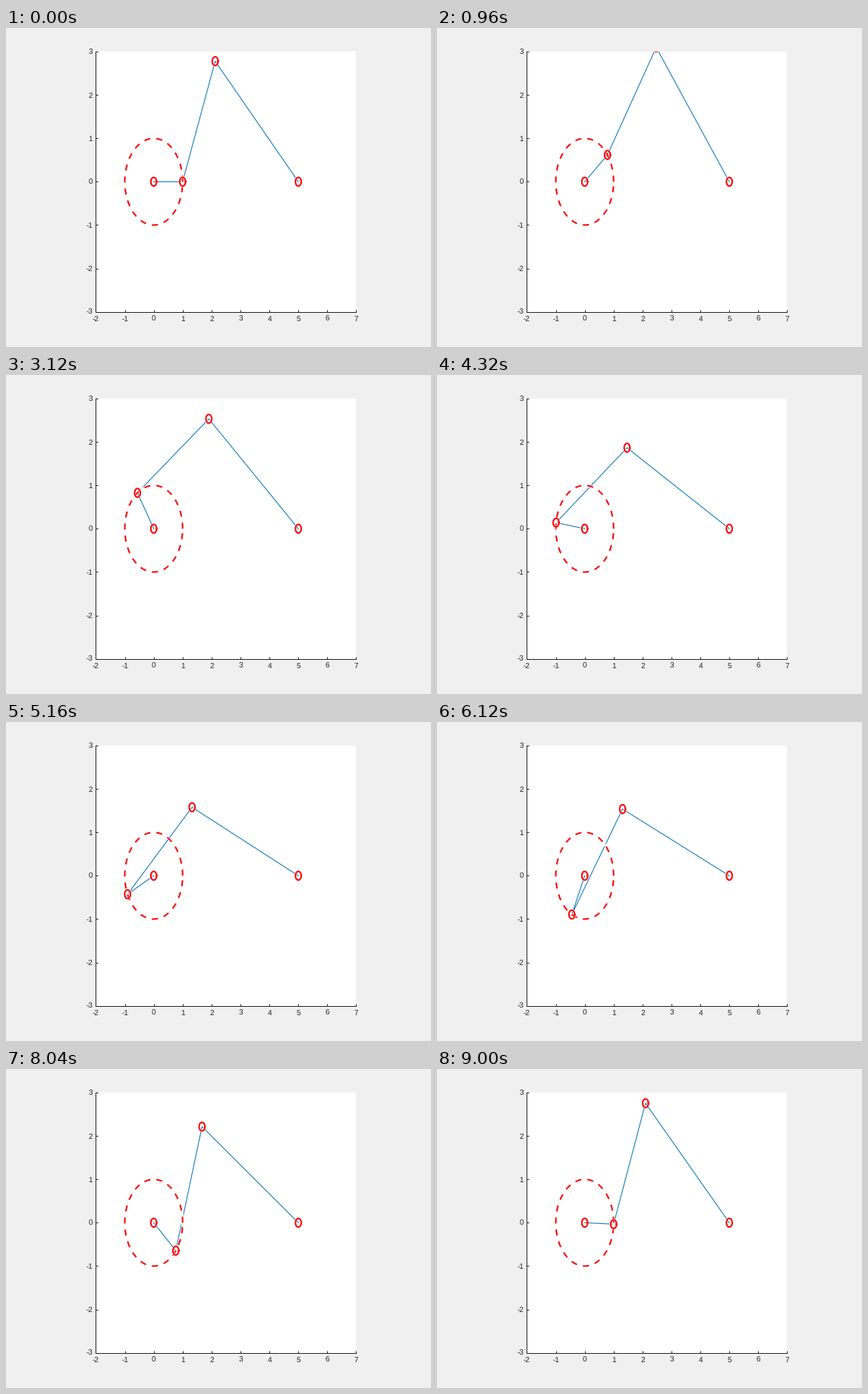
Write a matplotlib script that moves like this. It is 560 px wide and 420 px high and loops after 9120 ms.

```python
import numpy as np
import matplotlib.pyplot as plt
from matplotlib.animation import FuncAnimation

plt.rcParams["text.hinting"] = "none"

W, H, DPI = 560, 420, 100
PX = 72 / DPI                      # one pixel in points
LEFT, RIGHT, TOP, BOTTOM = 118.4, 461.4, 31.2, 373.6
X_MIN, X_MAX, Y_MIN, Y_MAX = -2, 7, -3, 3
INK, RED, BLUE = "#262626", "#ff0000", "#0072bd"

CRANK, COUPLER, ROCKER, GROUND = 1, 3, 4, 5
JOINT_R = 0.1
FRAMES, INTERVAL, STEP = 76, 120, 1 / 12

fig = plt.figure(figsize=(W / DPI, H / DPI), dpi=DPI, facecolor="#f0f0f0")
ax = fig.add_axes([LEFT / W, 1 - BOTTOM / H, (RIGHT - LEFT) / W, (BOTTOM - TOP) / H])
ax.set(xlim=(X_MIN, X_MAX), ylim=(Y_MIN, Y_MAX), facecolor="white")
ax.set_xticks(range(X_MIN, X_MAX + 1))
ax.set_yticks(range(Y_MIN, Y_MAX + 1))
ax.tick_params(direction="in", length=3 * PX, width=PX, color=INK,
               labelbottom=False, labelleft=False)
for side, spine in ax.spines.items():
    spine.set_visible(side in ("left", "bottom"))
    spine.set(linewidth=PX, edgecolor=INK)


def label(x, y, value, ha):
    fig.text(x / W, 1 - y / H, str(value), ha=ha, va="baseline",
             family="Liberation Sans", fontsize=10 * PX, color=INK)


for v in range(X_MIN, X_MAX + 1):
    x = LEFT + (v - X_MIN) * (RIGHT - LEFT) / (X_MAX - X_MIN)
    label(x, 386, v, "center")
for v in range(Y_MIN, Y_MAX + 1):
    y = BOTTOM - (v - Y_MIN) * (BOTTOM - TOP) / (Y_MAX - Y_MIN)
    label(114, y + 3.5, v, "right")


def circle(center, r, n=181):
    t = np.linspace(0, 2 * np.pi, n)
    return center[0] + r * np.cos(t), center[1] + r * np.sin(t)


def outlined(zorder, style="-"):
    """A red line on a slightly wider white one."""
    halo, = ax.plot([], [], color="white", lw=3 * PX, zorder=zorder)
    line, = ax.plot([], [], color=RED, lw=2 * PX, ls=style, zorder=zorder + 0.1,
                    dash_capstyle="butt")
    return halo, line


def place(pair, xs, ys):
    for line in pair:
        line.set_data(xs, ys)


links, = ax.plot([], [], color=BLUE, lw=PX, zorder=2)
orbit = outlined(2.2, (0, (4, 4)))
place(orbit, *circle((0, 0), CRANK))
joints = [outlined(2.4) for _ in range(4)]


def linkage(angle):
    base, end = np.zeros(2), np.array([GROUND, 0.0])
    pin = CRANK * np.array([np.cos(angle), np.sin(angle)])
    gap = end - pin
    d = np.hypot(*gap)
    along = (COUPLER**2 - ROCKER**2 + d**2) / (2 * d)
    height = np.sqrt(COUPLER**2 - along**2)
    u = gap / d
    elbow = pin + along * u + height * np.array([-u[1], u[0]])
    return np.array([base, pin, elbow, end])


def draw(i):
    points = linkage(i * STEP)
    links.set_data(points[:, 0], points[:, 1])
    for pair, p in zip(joints, points):
        place(pair, *circle(p, JOINT_R, 61))
    return []


anim = FuncAnimation(fig, draw, frames=FRAMES, interval=INTERVAL,
                     repeat=True, repeat_delay=0, blit=False)
plt.show()
```
